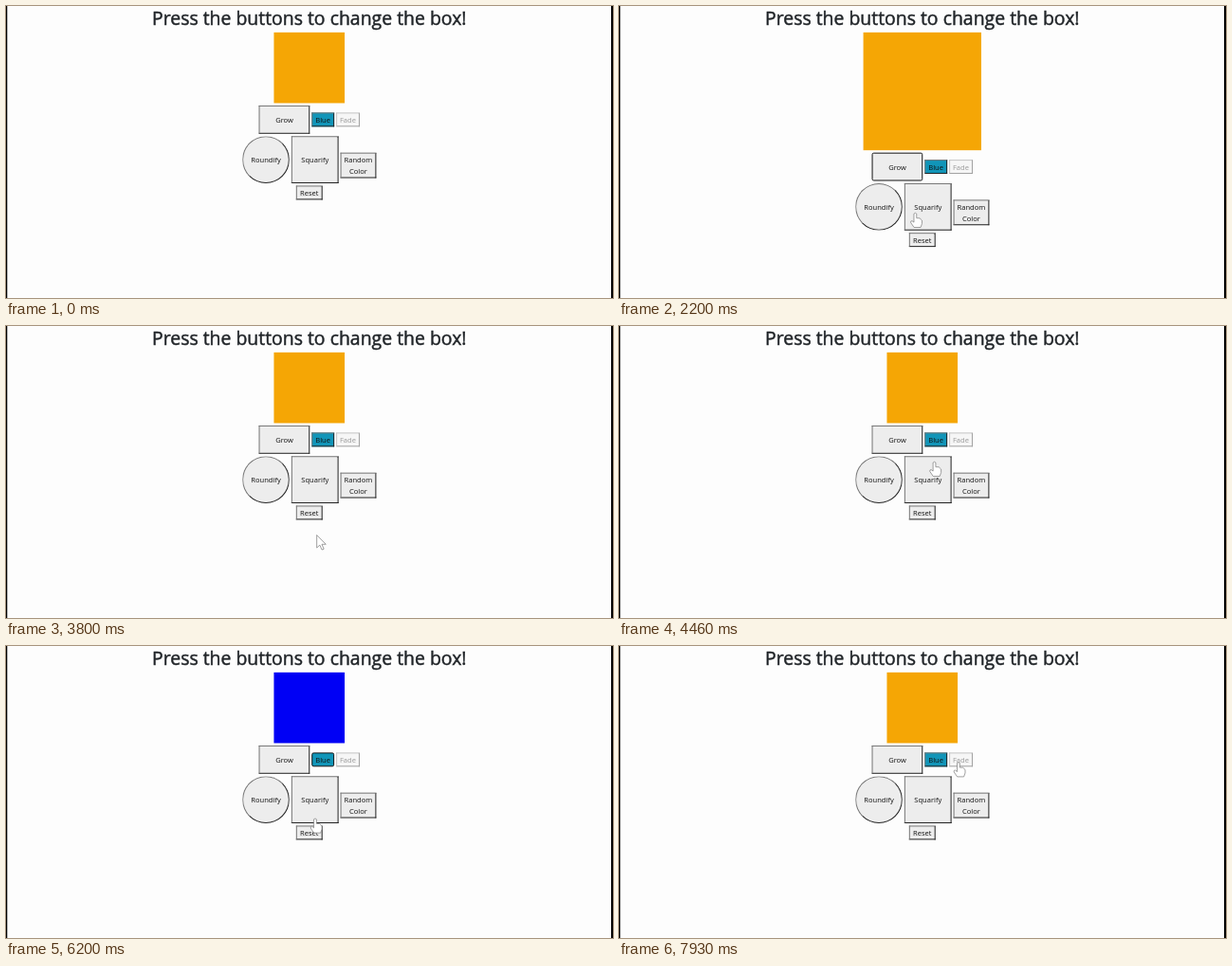
These frames come from a looping animation (640 by 308 pixels, 8000 ms). An HTML page:

```html
<!DOCTYPE html>
<html lang="en">
<head>
<meta charset="utf-8">
<title>Box buttons</title>
<style>
  html, body { margin: 0; width: 100%; height: 100%; overflow: hidden; }
  body { background: #fdfdfd; box-shadow: inset 1.3px 0 #000, inset -2px 0 #000; }
  /* A full-size page, shown at about half scale */
  #page {
    position: absolute; width: 1286px; transform: scale(.4973); transform-origin: 0 0;
    display: flex; flex-direction: column; align-items: center; gap: 5px;
    font: 15.2px/24px "Open Sans", "Noto Sans", sans-serif; color: #212529;
  }
  h1 { margin: 0 0 3px; font-size: 39.1px; line-height: 48px; font-weight: 400;
       position: relative; top: 1px; -webkit-text-stroke: .9px; }
  .row { display: flex; align-items: baseline; gap: 4px; }
  button {
    margin: 0; padding: 1px 6px; font: inherit; color: #111; background: #ededed;
    border: 2px solid; border-color: #767676 #222 #222 #767676; border-radius: 0; outline: none;
  }
  #grow { width: 108px; height: 60px; }
  #round, #square { width: 100px; height: 100px; padding: 0; }
  #round { border-radius: 50%; }
  #blue { background: #1195b8; }
  #fade { opacity: .42; }
  button.focused { border-color: #111; border-radius: 4px; }
  #cursor { position: absolute; left: 0; top: 0; overflow: visible; pointer-events: none; }
</style>
</head>
<body>
<div id="page">
  <h1>Press the buttons to change the box!</h1>
  <div id="box"></div>
  <div class="row">
    <button id="grow">Grow</button>
    <button id="blue">Blue</button>
    <button id="fade">Fade</button>
  </div>
  <div class="row">
    <button id="round">Roundify</button>
    <button id="square">Squarify</button>
    <button id="random">Random<br>Color</button>
  </div>
  <button id="reset">Reset</button>
</div>
<svg id="cursor" width="1" height="1" stroke="#777" stroke-width=".7" fill="#fff" stroke-linejoin="round">
  <path id="arrow" d="M0 0V13.5L3.2 10.6L5.4 15.6L7.5 14.7L5.3 9.8H9.6Z"/>
  <path id="hand" d="M-1.5 1Q0-.6 1.3 1V5.6Q5 4.6 7 8V11.4L5.6 15.4H-1.4L-4.8 10.4Q-5.2 8.4-3.5 8.5L-1.5 10Z"/>
</svg>
<script>
const DURATION = 8000, FRAME = 200 / 3;
const $ = id => document.getElementById(id);
const clamp01 = v => Math.max(0, Math.min(1, v));
const smooth = k => k * k * (3 - 2 * k);
const decelerate = k => k * (1.4 - .4 * k);

// Each click: the button takes focus when pressed and acts when released.
const clicks = [
  { id: "grow", press: 1060, release: 1130, blur: 3400 },
  { id: "reset", press: 3400, release: 3530, blur: 3530 },
  { id: "blue", press: 5330, release: 5400, blur: 6930 },
  { id: "reset", press: 6930, release: 7130, blur: 7260 }
];
const [growClick, firstReset, blueClick, lastReset] = clicks;

// Pointer moves: start time, end time, x, y
const entry = [465, 114];
const moves = [
  [60, 730, 283, 122],
  [1800, 2460, 325, 259],
  [2600, 3000, 327, 245],
  [3730, 4000, 329, 172],
  [4130, 4800, 335, 124],
  [5660, 5860, 334, 158],
  [5930, 6460, 321, 197],
  [7330, 7930, 358, 122.5]
];

function pointerAt(t) {
  let [x, y] = entry;
  for (const [start, end, toX, toY] of moves) {
    const k = decelerate(clamp01((t - start) / (end - start)));
    x += (toX - x) * k;
    y += (toY - y) * k;
  }
  return [x, y];
}

function draw(time) {
  // The picture advances in steps of a fifteenth of a second.
  const t = Math.round(Math.floor((time % DURATION + 7) / FRAME) * FRAME);

  const growth = t < firstReset.release ? smooth(clamp01((t - growClick.release) / 270)) : 0;
  const isBlue = t >= blueClick.release && t < lastReset.release;
  const box = $("box").style;
  box.width = box.height = 150 + 100 * growth + "px";
  box.background = isBlue ? "#0000f5" : "#f5a605";

  const active = clicks.find(c => t >= c.press && t < c.blur);
  for (const button of document.querySelectorAll("button"))
    button.classList.toggle("focused", button.id === active?.id);

  const [x, y] = pointerAt(t);
  const hovering = document.elementFromPoint(x, y)?.closest("button");
  $("cursor").style.display = t < 60 ? "none" : "";
  $("cursor").style.transform = `translate(${x}px, ${y}px)`;
  $("hand").style.display = hovering ? "" : "none";
  $("arrow").style.display = hovering ? "none" : "";
}

const start = performance.now();
function tick() {
  draw(performance.now() - start);
  requestAnimationFrame(tick);
}
tick();
</script>
</body>
</html>
```
